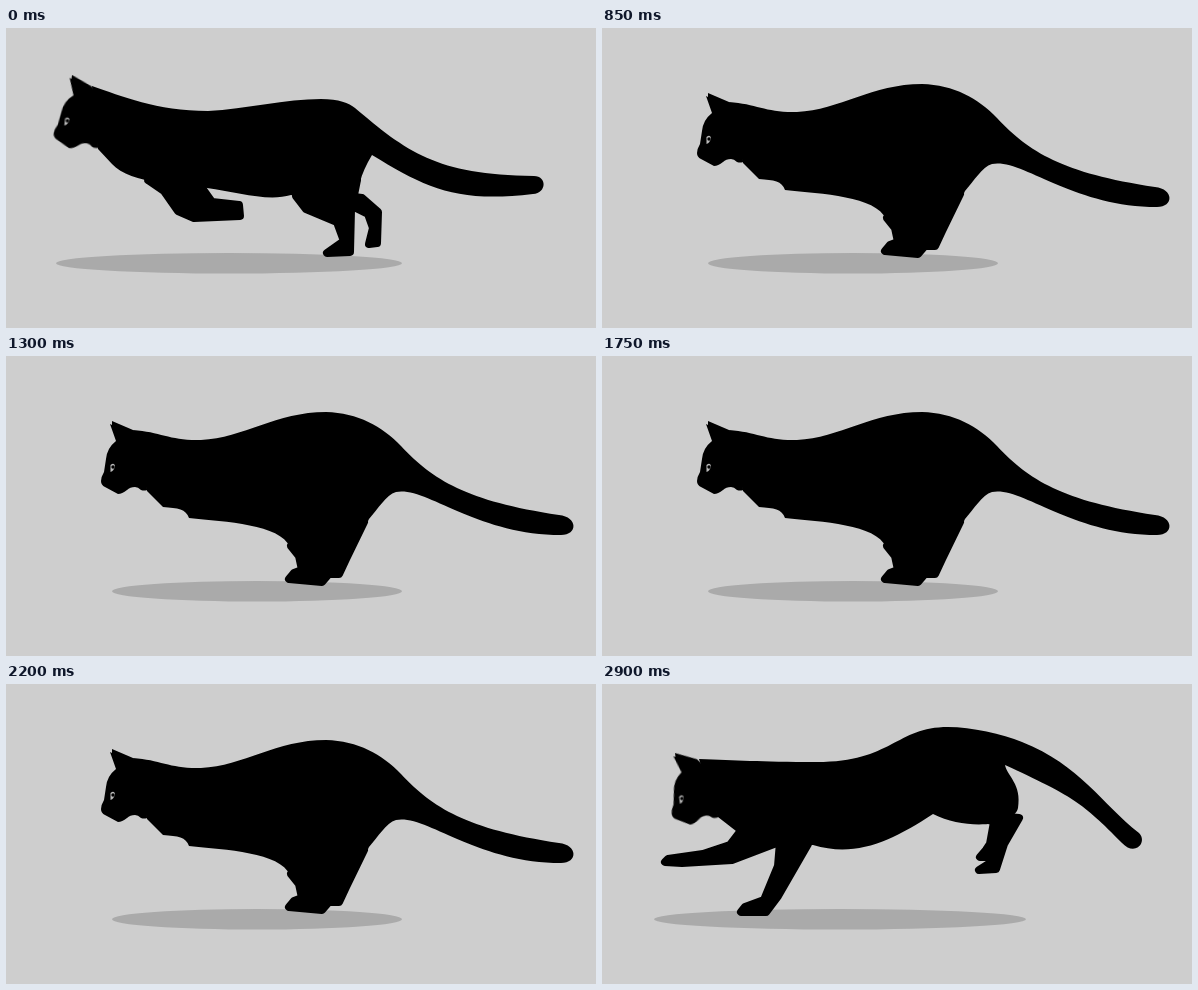
These frames come from a looping animation (590x300 px, 2950 ms). An HTML page without scripts:

```html
<!DOCTYPE html>
<html lang="en">
<head>
<meta charset="utf-8">
<title>Running cat</title>
<style>
html, body { margin: 0; width: 100%; height: 100%; overflow: hidden; background: #cecece; }
svg { display: block; width: 590px; height: 300px; overflow: hidden; }

/* Nine poses side by side; each is frozen at its own point of the stride. */
.pose { transform: translateX(calc(var(--i) * 590px)); }
.pose > * {
  animation: 800000s linear both paused;
  animation-delay: calc(var(--i) * -100000s);
}
.pose > ellipse { animation-name: shade; fill: #aaa; }
.pose > .torso { animation-name: torso; }
.pose > .hind { animation-name: hind; }
.pose > .front { animation-name: front; }
.pose > use { animation-name: head; }
.hind, .front { stroke: #000; stroke-width: 8px; stroke-linejoin: round; }

@keyframes shade {
  0% { cx: 223px; rx: 173px; }
  25% { cx: 224px; rx: 185px; }
  50% { cx: 238px; rx: 186px; }
  100% { cx: 251px; rx: 145px; }
}
@keyframes head {
  0% { transform: translate(66px, 47px) rotate(7deg); }
  50% { transform: translate(73px, 69px) rotate(-7.3deg); }
  100% { transform: translate(106px, 65px) rotate(0deg); }
}
@keyframes torso {
  0% { d: path("M86 58C116 68 150 83 202 83C240 81 280 71 315 71C333 71 343 75 349 80C400 123 430 147 528 148C541 148 541 165 527 166C450 175 420 160 366 127C360 137 356 146 354 154C350 175 310 172 285 167C262 174 230 164 201 160C180 158 124 156 106 136L92 121Z"); }
  50% { d: path("M97 75C136 76 155 78 215 78C290 78 294 43 346 43C370 43 400 50 420 58C478 81 500 120 537 149C546 158 533 173 520 159C480 118 470 112 403 81C405 92 420 100 416 124C412 142 365 147 331 130C290 157 254 174 211 161C185 160 150 160 134 147L116 133Z"); }
  100% { d: path("M127 74C155 76 165 85 195 84C238 82 270 56 320 56C352 57 376 70 395 90C427 124 460 145 553 159C572 161 572 179 555 179C470 179 420 130 390 136C380 139 372 153 363 163C350 195 310 195 284 191C274 168 220 166 183 162C180 153 172 152 157 151L141 135Z"); }
}
@keyframes hind {
  0% { d: path("M290 168L300 181 331 194 338 213 321 225 344 224 345 182 351 152ZM340 168L350 180 362 186 367 200 363 216 371 215 372 184 356 170Z"); }
  50% { d: path("M372 130L394 136 392 160 388 179 377 186 394 185 402 160 417 134ZM372 130L392 138 388 160 384 166 378 173 384 173 394 160 410 135Z"); }
  100% { d: path("M285 190L293 200 296 214 288 217 283 223 316 226 334 205 356 166ZM300 185L302 195 310 205 312 215 318 218 333 218 340 203 358 166Z"); }
}
@keyframes front {
  0% { d: path("M142 152L158 163 172 183 188 190 234 188 233 177 206 174 196 160ZM142 152L160 163 176 180 195 188 230 186 228 178 206 174 196 160Z"); }
  25% { d: path("M135 152L115 164 90 172 60 176 56 180 72 184 120 180 200 160ZM124 144L112 154 84 160 48 155 44 159 60 166 115 170 170 164Z"); }
  50% { d: path("M178 158L176 182 162 216 143 223 139 228 164 228 176 212 206 160ZM138 148L128 161 101 170 66 175 63 178 80 179 130 176 172 160Z"); }
  75% { d: path("M176 156L186 180 206 212 194 222 192 228 214 228 222 200 224 160ZM152 152L164 178 170 202 156 214 150 222 166 224 182 200 186 160Z"); }
  100% { d: path("M185 150L190 152 195 155 190 157 200 158 210 158 215 155 220 150ZM185 150L190 152 195 155 190 157 200 158 210 158 215 155 220 150Z"); }
}

/* Six full strides of 450 ms and five poses of a seventh, then a cut. */
#strip { animation: run 2.95s infinite; }
@keyframes run {
  0%, 15.2542%, 30.5084%, 45.7627%, 61.0169%, 76.2711% {
    transform: translateX(0px);
    animation-timing-function: steps(9);
  }
  15.2541%, 30.5083%, 45.7626%, 61.0168%, 76.271%, 91.5253% {
    transform: translateX(-5310px);
    animation-timing-function: step-end;
  }
  91.5254% { transform: translateX(0px); animation-timing-function: steps(5); }
  100% { transform: translateX(-2950px); }
}
</style>
</head>
<body>
<svg viewBox="0 0 590 300">
<defs>
  <!-- ear tip at 0,0 -->
  <g id="head">
    <path d="M4 20L-2 3 0 4 0 0 21 9 34 25 35 69Q32 70 29 69 26 66 23 66 18 66 15 69 10 73 6 73L-7 66Q-11 64-11 60-11 56-8 51L-6 38Q-5 27 4 20Z"/>
    <path d="M-1.5 51V44Q2 41 3 45 2 50-1.5 51Z" fill="#bbb"/>
    <circle cx="1" cy="46" r="1.7"/>
  </g>
</defs>
<g id="strip">
  <g class="pose" style="--i:0"><ellipse cy="235.3" ry="10.3"/><path class="torso"/><path class="hind"/><path class="front"/><use href="#head"/></g>
  <g class="pose" style="--i:1"><ellipse cy="235.3" ry="10.3"/><path class="torso"/><path class="hind"/><path class="front"/><use href="#head"/></g>
  <g class="pose" style="--i:2"><ellipse cy="235.3" ry="10.3"/><path class="torso"/><path class="hind"/><path class="front"/><use href="#head"/></g>
  <g class="pose" style="--i:3"><ellipse cy="235.3" ry="10.3"/><path class="torso"/><path class="hind"/><path class="front"/><use href="#head"/></g>
  <g class="pose" style="--i:4"><ellipse cy="235.3" ry="10.3"/><path class="torso"/><path class="hind"/><path class="front"/><use href="#head"/></g>
  <g class="pose" style="--i:5"><ellipse cy="235.3" ry="10.3"/><path class="torso"/><path class="hind"/><path class="front"/><use href="#head"/></g>
  <g class="pose" style="--i:6"><ellipse cy="235.3" ry="10.3"/><path class="torso"/><path class="hind"/><path class="front"/><use href="#head"/></g>
  <g class="pose" style="--i:7"><ellipse cy="235.3" ry="10.3"/><path class="torso"/><path class="hind"/><path class="front"/><use href="#head"/></g>
  <g class="pose" style="--i:8"><ellipse cy="235.3" ry="10.3"/><path class="torso"/><path class="hind"/><path class="front"/><use href="#head"/></g>
</g>
</svg>
</body>
</html>
```
